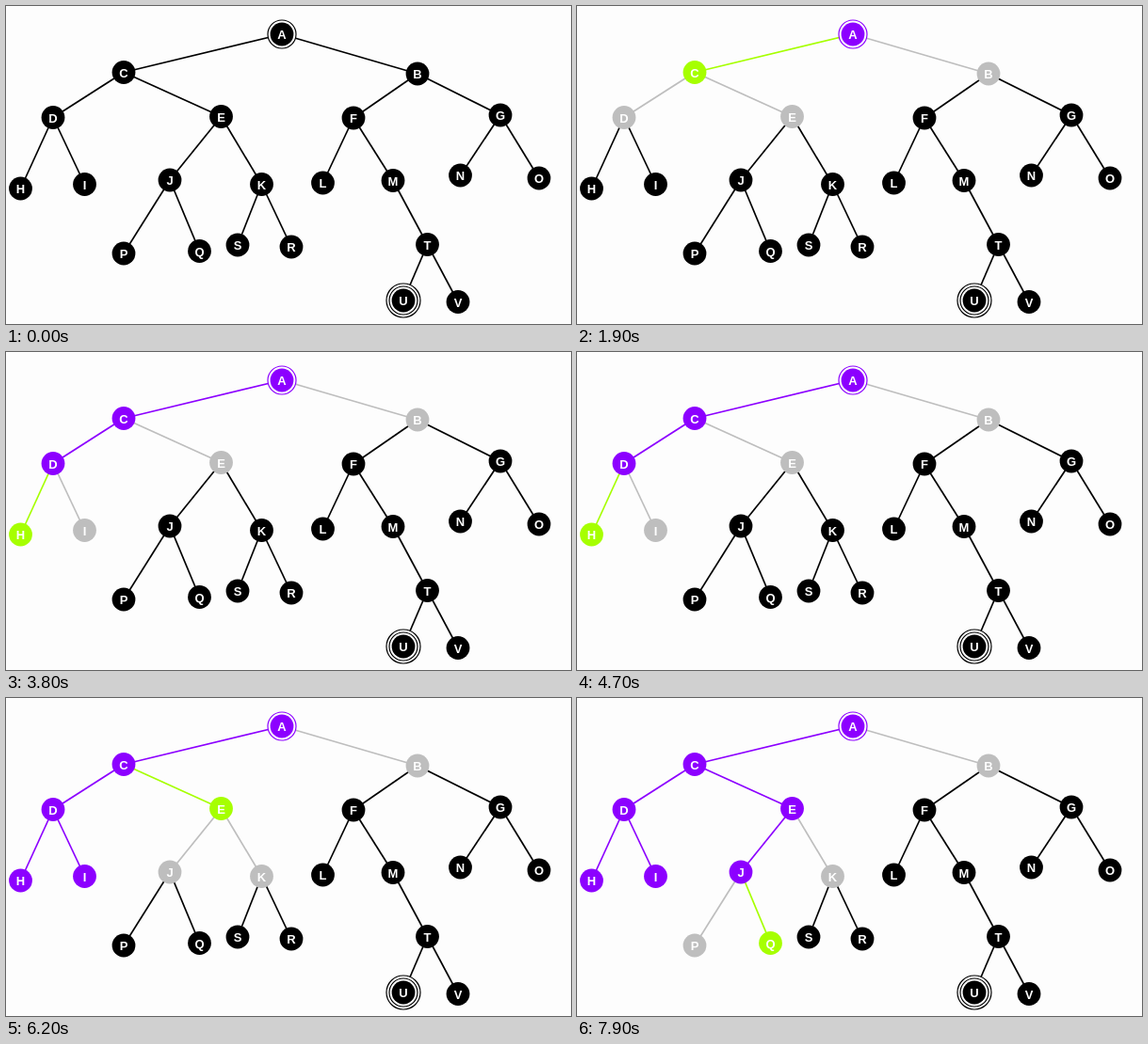
An HTML page for the animation above (8 s loop, 600 px wide and 338 px high).

```html
<!DOCTYPE html>
<html lang="en">
<head>
<meta charset="utf-8">
<title>Depth-first search</title>
<style>
  html, body { margin: 0; width: 100%; height: 100%; overflow: hidden; background: #fdfdfd; }
  svg { display: block; width: 600px; height: 338px; }
  line { stroke-width: 1.7; }
  .gap { fill: #fdfdfd; stroke-width: 1.2; }
  text { font: bold 13px "Liberation Sans", Arial, sans-serif; fill: #fff; text-anchor: middle; }
</style>
</head>
<body>
<svg viewBox="0 0 600 338"></svg>
<script>
// name: [x, y, parent, rings]
const nodes = {
  A: [293, 30, '', 1],
  B: [437, 72, 'A'], C: [125, 70.5, 'A'],
  D: [50, 118.5, 'C'], E: [228.5, 117.5, 'C'],
  F: [369, 119, 'B'], G: [525, 116, 'B'],
  H: [15.5, 194, 'D'], I: [83.5, 189.5, 'D'],
  J: [174, 185, 'E'], K: [271.5, 189.5, 'E'],
  L: [336.5, 188, 'F'], M: [411, 185.5, 'F'],
  N: [482.5, 180, 'G'], O: [566, 183, 'G'],
  P: [125, 263, 'J'], Q: [205.5, 260.5, 'J'],
  R: [303, 256, 'K'], S: [246, 254, 'K'],
  T: [447.5, 253.5, 'M'],
  U: [422, 313, 'T', 2], V: [480, 314.5, 'T']
};
const visits = 'ACDHIEJQ', loop = 8000, firstVisit = 800, stepTime = 1000;
const unseen = '#000', open = '#bebebe', current = '#a6ff00', done = '#8c00ff';
const svg = document.querySelector('svg');

function add(parent, tag, attrs) {
  const el = document.createElementNS('http://www.w3.org/2000/svg', tag);
  for (const key in attrs) el.setAttribute(key, attrs[key]);
  return parent.appendChild(el);
}

const edges = add(svg, 'g'), discs = add(svg, 'g'), parts = {};
for (const [name, [x, y, parent, rings = 0]] of Object.entries(nodes)) {
  const group = add(discs, 'g');
  for (let i = rings; i > 0; i--)
    add(group, 'circle', { cx: x, cy: y, r: 12 + 3 * i, class: 'gap' });
  add(group, 'circle', { cx: x, cy: y, r: 12.4, stroke: 'none' });
  add(group, 'text', { x, y: y + 5.2 }).textContent = name;
  parts[name] = [group];
  if (parent) {
    const [px, py] = nodes[parent];
    parts[name].push(add(edges, 'line', { x1: px, y1: py, x2: x, y2: y }));
  }
}

function colour(name, step) {
  const order = visits.indexOf(name);
  if (order >= 0 && order <= step) return order === step ? current : done;
  const parentOrder = visits.indexOf(nodes[name][2] || '-');
  return parentOrder >= 0 && parentOrder <= step ? open : unseen;
}

let shown;
function draw(now) {
  const step = Math.floor((now % loop - firstVisit) / stepTime);
  if (step !== shown) {
    shown = step;
    for (const name in parts)
      for (const part of parts[name]) {
        const c = colour(name, step);
        part.setAttribute('fill', c);
        part.setAttribute('stroke', c);
      }
    // Labels must not inherit the node's outline.
    for (const label of svg.querySelectorAll('text')) label.setAttribute('stroke', 'none');
  }
}

let start;
function frame(now) {
  start ??= now;
  draw(now - start);
  requestAnimationFrame(frame);
}
draw(0);
requestAnimationFrame(frame);
</script>
</body>
</html>
```
